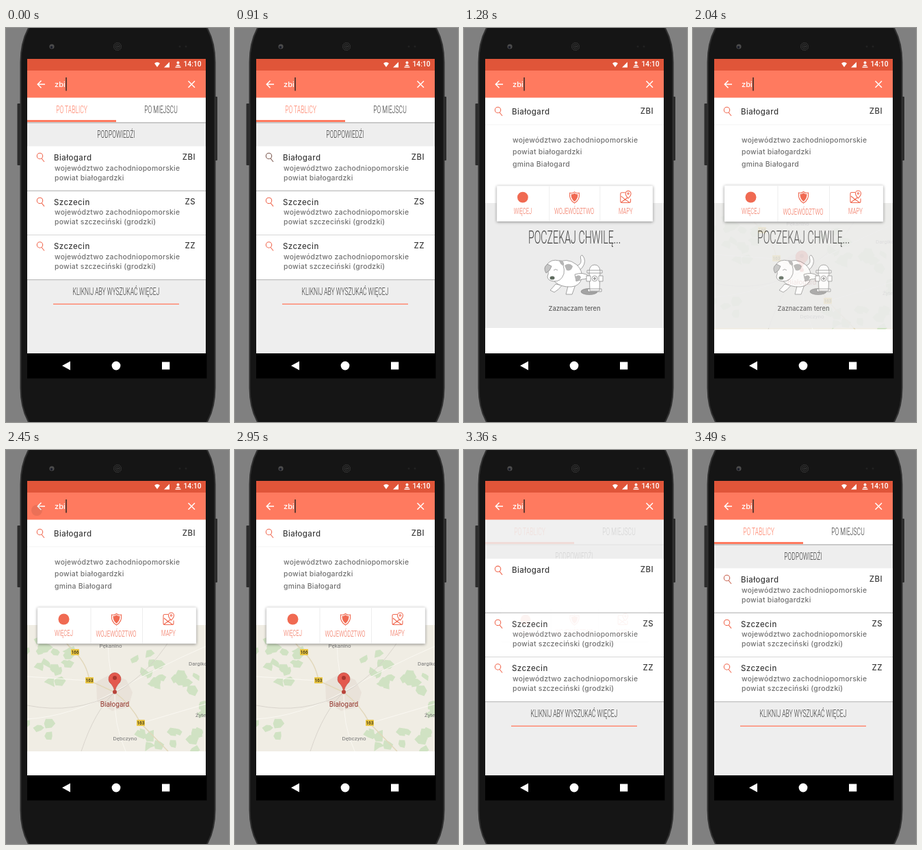
These frames come from a looping animation (326x574 px, 3750 ms). An HTML page:

```html
<!DOCTYPE html>
<html lang="pl">
<head>
<meta charset="utf-8">
<title>Wyszukiwarka tablic</title>
<style>
  html, body { margin: 0; width: 100%; height: 100%; overflow: hidden; background: #808080; }
  svg { display: block; width: 326px; height: 574px; }
  text { font-family: Inter, "Open Sans", sans-serif; }
  .title { font-size: 11.4px; font-weight: 500; letter-spacing: .45px; fill: #3c3c3c; }
  .desc { font-size: 10.4px; font-weight: 500; letter-spacing: .26px; fill: #707070; }
  .thin, .place, .clock { font-family: Roboto, Arial, sans-serif; }
  .thin { font-weight: 300; text-anchor: middle; }
  .place { font-size: 8px; fill: #777; }
  .end { text-anchor: end; }
  .mid { text-anchor: middle; }
  .line { fill: none; stroke: #f06a52; stroke-width: 1.1; }
  .ink { fill: #fff; stroke: #8c8c8c; stroke-width: .8; stroke-linejoin: round; }
</style>
</head>
<body>
<svg id="stage" viewBox="0 0 326 574"></svg>
<script>
const CORAL = '#ff7a5f';
const LOOP = 3750;

const rect = (x, y, w, h, fill, more = '') =>
  `<rect x="${x}" y="${y}" width="${w}" height="${h}" fill="${fill}" ${more}/>`;
const text = (x, y, cls, str) => `<text x="${x}" y="${y}" class="${cls}">${str}</text>`;
// Condensed display face: one squeeze for all headings
const thin = (x, y, size, fill, str) =>
  `<text class="thin" transform="translate(${x} ${y}) scale(.57 1)" font-size="${size}" fill="${fill}">${str}</text>`;
const lens = (y, id = '') =>
  `<g ${id} class="line"><circle cx="49.5" cy="${y - 2}" r="4.2"/><path d="M52 ${y + 1.5}l4 5"/></g>`;
const descLines = (y, gap, lines) => lines.map((s, i) => text(71, y + i * gap, 'desc', s)).join('');

let seed = 7;
const random = () => (seed = seed * 16807 % 2147483647) / 2147483647;

const province = 'województwo zachodniopomorskie';

const row = (y, code) => `
  ${rect(31, y, 261, 64, '#fff')}
  ${rect(31, y + 64, 261, 1.4, '#c4c4c4')}
  ${lens(y + 16)}
  ${text(70, y + 20.4, 'title', 'Szczecin')}
  ${text(277, y + 19.4, 'title end', code)}
  ${descLines(y + 35, 14, [province, 'powiat szczeciński (grodzki)'])}`;

const phone = `
  ${rect(16.5, 110, 6, 90, '#2c2c2c', 'rx="1"')}
  ${rect(303, 100, 6, 93, '#2c2c2c', 'rx="1"')}
  ${rect(21.5, -18, 284, 610, '#151515', 'rx="36" ry="68" stroke="#303030" stroke-width="2"')}
  <circle cx="67" cy="27" r="3.6" fill="#4b4b4b"/><circle cx="66.5" cy="28" r="1.8" fill="#181b28"/>
  <g fill="none" stroke="#555" stroke-dasharray="1.2 .9">
    <circle cx="163" cy="27" r="5.5"/><circle cx="163" cy="27" r="3.4"/><circle cx="163" cy="27" r="1.3"/></g>
  <circle cx="254" cy="27" r="1.5" fill="#222"/><circle cx="263" cy="27" r="1.5" fill="#222"/>`;

const bars = `
  ${rect(31, 45, 261, 17, '#e05539')}
  ${rect(31, 62, 261, 39.5, CORAL)}
  <g fill="#fff">
    <path d="M217 51.5q4-3.6 8 0l-4 5.5z"/>
    <path d="M231 57.5h8v-8z"/>
    <circle cx="251.5" cy="50.5" r="2"/><path d="M248 55.5q3.5-4.5 7 0zM247.5 56.5h8v1.2h-8z"/>
    <text x="259.5" y="56.4" class="clock" font-size="10.3" font-weight="500">14:10</text>
    <text x="71" y="85.5" font-size="11" font-weight="500">zbi</text>
  </g>
  <path d="M57 82H46.5M51.5 76.8L46.3 82l5.2 5.2M266.5 77.2l9.5 9.5m0-9.5l-9.5 9.5" fill="none" stroke="#fff" stroke-width="1.5"/>
  ${rect(87.3, 72, 1.4, 19.5, '#222')}
  ${rect(31, 474, 262.5, 36.5, '#000')}
  <path d="M82 492l12-6.5v13z" fill="#fff"/><circle cx="161" cy="492" r="6.4" fill="#fff"/>
  ${rect(228, 486.5, 11.3, 11, '#fff')}`;

const tabs = `
  ${rect(31, 137, 261, 2, '#c9c9c9')}
  ${rect(31, 101, 261, 36, '#fff')}
  ${rect(31, 134, 130, 3, CORAL)}
  ${thin(96, 123.5, 15, CORAL, 'PO TABLICY')}
  ${thin(226.5, 123.5, 15, '#333', 'PO MIEJSCU')}
  ${thin(161, 160, 15, '#333', 'PODPOWIEDŹI')}`;

// Patches of wood scattered around a few centres: x, y, spread, count
const woods = [
  [44, 285, 15, 7], [76, 300, 18, 8], [60, 325, 22, 6], [205, 296, 28, 5], [212, 332, 14, 7],
  [262, 340, 20, 7], [284, 378, 10, 3], [264, 425, 22, 9], [212, 422, 16, 6], [48, 408, 20, 4]
].map(([x, y, spread, count]) => Array.from({ length: count }, () => {
  const cx = x + (random() * 2 - 1) * spread, cy = y + (random() * 2 - 1) * spread * .7;
  const corners = [0, 1, 2, 3, 4, 5].map(i => {
    const r = 3 + random() * 6;
    return [cx + r * 1.2 * Math.cos(i * 1.05), cy + r * Math.sin(i * 1.05)].map(v => v.toFixed(1));
  });
  return `M${corners.join('L')}z`;
}).join('')).join('');

const roadSign = (x, y, n) => `
  ${rect(x - 6, y - 5, 12, 9, '#e9c543', 'rx="1"')}
  <text x="${x}" y="${y + 2.2}" class="place mid" style="font-size:6.5px;font-weight:700;fill:#554a20">${n}</text>`;

const map = `
  <clipPath id="area">${rect(31, 255, 261, 184, '#fff')}</clipPath>
  <g clip-path="url(#area)">
    ${rect(31, 255, 261, 184, '#f0ede4')}
    <path fill="#d0e2c3" d="${woods}"/>
    <path fill="#e9e2d9" d="M132 338l22-12 22 9 9 18-6 22-24 5-22-14z"/>
    <path fill="none" stroke="#faf8f2" d="M31 392q64-4 128-40t133-66M150 255q-4 50 9 97-2 48 16 87M31 330l88 6M197 398l95-28"/>
    <path fill="none" stroke="#d3cfc7" stroke-width=".8" d="M31 372q70 14 128-18t93-99M110 439q20-60 49-86"/>
    <path fill="none" stroke="#e2d8bb" stroke-width="1.5" d="M70 255q14 24 31 40t21 41q20 9 37 17 24 18 38 45l40 41"/>
    ${roadSign(101, 295, 166)}${roadSign(122, 336, 163)}${roadSign(197, 398, 163)}
    ${text(153, 288, 'place mid', 'Pękanino')}
    ${text(267, 314, 'place', 'Dargikowo')}
    ${text(277, 389, 'place', 'Żytelkowo')}
    ${text(174, 423, 'place mid', 'Dębczyno')}
    <text x="159" y="373.5" class="place mid" style="font-size:10px;fill:#963a32">Białogard</text>
    <circle cx="159" cy="352.5" r="3" fill="#b8443c"/>
    <path d="M159 352q-1.5-7-5-11a9 9 0 1 1 10 0q-3.500 4-5 11z" fill="#e3594e" stroke="#b8443c" stroke-width=".6"/>
    <circle cx="159" cy="332" r="3" fill="#a9362f"/>
  </g>`;

const dog = `
  <ellipse cx="183" cy="384" rx="12" ry="4.5" fill="#a3a3a3" stroke="#858585" stroke-width=".6"/>
  <g class="ink">
    <path d="M163 347q9-2 8-9-2-7 2-7 7 8 0 18-3 4-8 5z"/>
    <path d="M152 376l-3 12h9l5-14zM134 373q-5 6-8 9l6 3q7-4 11-10z"/>
    <path d="M134 343q16-10 31 2 9 9 7 20-3 11-15 12-16 1-25-8z"/>
    <path d="M162 359q12-4 20 2 0 5-9 5l-9 3z"/>
    <path d="M121 345q6-9 18-6 9 6 7 19-4 12-15 11-9-1-9-7 2-4 1-8-4-4-2-9z"/>
    <path d="M122 344q-7 5-2 13 6-3 8-10z" fill="#c4c4c4"/>
    <path d="M131 353q3-3 6 0" fill="none"/>
    <path d="M183 354q1-9 8-9t8 9l-1 29h-14zM180 353h22v4h-22zM181 380h20v4h-20z"/>
    <path d="M179 361h6v8h-6zM197 361h6v8h-6z"/>
    <circle cx="191" cy="365" r="4"/><circle cx="191" cy="365" r="1.5" fill="#aaa"/>
  </g>
  <path d="M147 346q7-5 12 1-2 8-9 6zM163 362q6-4 8 1-2 7-8 5zM139 338q8 0 7 8-6-1-7-8z" fill="#b5b5b5"/>
  <ellipse cx="129" cy="364" rx="3.5" ry="2.600" fill="#5d6a5d"/>`;

const waiting = `
  ${rect(31, 255, 261, 182, '#ececec')}
  ${thin(161.5, 314, 25, '#444', 'POCZEKAJ CHWILĘ...')}
  ${dog}
  <text x="161.5" y="412" class="mid" font-size="9.2" font-weight="500" fill="#606060">Zaznaczam teren</text>`;

const panel = `
  ${rect(46, 229.5, 232, 52.5, '#fff', 'id="shadow" style="filter:drop-shadow(0 1.5px 2px #0007)"')}
  ${rect(46, 229.5, 232, 52.5, '#fff', 'stroke="#eee" stroke-width=".6"')}
  ${rect(123.5, 230, 1, 52, '#eee')}${rect(199, 230, 1, 52, '#eee')}
  <circle cx="84.5" cy="246.5" r="8" fill="#f06a52"/>
  <g class="line">
    <path d="M154.5 240q4 1 7-1.5 3 2.5 7 1.5 1.5 10-7 15-8.5-5-7-15z"/>
    <path d="M157 242.5q3 0 4.5-1.500 1.5 1.5 4.5 1.5 0 6-4.5 9.5-4.5-3.5-4.5-9.5z" fill="#f06a52"/>
    <path d="M237 239.5h-5q-2 0-2 2v11q0 2 2 2h11q2 0 2-2v-4M231 254l12-9M231 245l5 4 7 5"/>
    <path d="M241.5 248q-4-4-4-7a4 4 0 0 1 8 0q0 3-4 7z" fill="#fff"/><circle cx="241.5" cy="241" r="1.2"/>
  </g>
  ${thin(84.5, 271, 13.5, '#f06a52', 'WIĘCEJ')}
  ${thin(161, 271.5, 13.5, '#f06a52', 'WOJEWÓDZTWO')}
  ${thin(237.5, 271, 13.5, '#f06a52', 'MAPY')}`;

document.getElementById('stage').innerHTML = `
  <clipPath id="body">${rect(31, 101, 261, 373, '#fff')}</clipPath>
  ${rect(0, 0, 326, 574, '#808080')}
  ${phone}
  <g clip-path="url(#body)">
    ${rect(31, 101, 261, 374, '#eee')}
    <g id="tabs">${tabs}</g>
    ${row(237.4, 'ZS')}${row(302, 'ZZ')}
    ${thin(161, 389, 15, '#333', 'KLIKNIJ ABY WYSZUKAĆ WIĘCEJ')}
    ${rect(69, 401.5, 184, 1.5, '#ff8a72')}
    <rect id="edge" x="31" width="261" height="1.4" fill="#bbb"/>
    <rect id="card" x="31" width="261" fill="#fff"/>
    <g id="head">
      ${lens(188.5, 'id="lens"')}
      ${text(70, 192.6, 'title', 'Białogard')}${text(277, 191.6, 'title end', 'ZBI')}
    </g>
    <g id="brief">${descLines(207.5, 14, [province, 'powiat białogardzki'])}</g>
    <g id="details">
      ${rect(31, 140.5, 261, .8, '#f1f1f1')}
      ${descLines(167, 17.3, [province, 'powiat białogardzki', 'gmina Białogard'])}
    </g>
    <g id="map">${map}</g>
    <g id="waiting">${waiting}</g>
    <g id="panel">${panel}</g>
  </g>
  ${bars}
  <circle id="tap" r="8" fill="#000"/>`;

const el = {};
document.querySelectorAll('[id]').forEach(node => el[node.id] = node);
const set = (id, attrs) => {
  for (const key in attrs) el[id].setAttribute(key, attrs[key]);
};

const seg = (t, a, b) => Math.min(1, Math.max(0, (t - a) / (b - a)));
const ease = k => k < .5 ? 2 * k * k : 1 - 2 * (1 - k) ** 2;
const easeOut = k => 1 - (1 - k) ** 3;
// Rises over a..b and falls over c..d
const hump = (t, a, b, c, d) => ease(seg(t, a, b)) * (1 - ease(seg(t, c, d)));

function draw(t) {
  const open = hump(t, 930, 1200, 3100, 3480);
  const top = 172.3 - 71 * open;
  const bottom = 236.4 + 240 * hump(t, 990, 1220, 3060, 3220);
  set('card', { y: top, height: bottom - top });
  set('edge', { y: bottom });
  set('head', { transform: `translate(0 ${-67 * open})` });
  set('brief', { transform: `translate(0 ${-67 * open})`, opacity: 1 - hump(t, 905, 1010, 3370, 3480) });
  set('tabs', { opacity: 1 - hump(t, 910, 1030, 3320, 3470) });
  set('details', { opacity: hump(t, 1110, 1260, 3050, 3200) });

  set('waiting', { opacity: seg(t, 1160, 1270) * (1 - seg(t, 2010, 2250)) });
  set('map', { opacity: t < 1900 ? 0 : 1 - seg(t, 3050, 3170) });

  const scale = .93 + .07 * easeOut(seg(t, 1130, 1540)) - .08 * seg(t, 3050, 3400);
  set('panel', {
    transform: `translate(162 256) scale(${scale}) translate(-162 -256)`,
    opacity: hump(t, 1130, 1260, 3230, 3390)
  });
  set('shadow', { opacity: hump(t, 1130, 1270, 3050, 3250) });

  const dark = t >= 910 && t < 1280 ? 1 - seg(t, 950, 1150) : .35 * seg(t, 3440, 3490);
  el.lens.style.stroke = `rgb(${240 - 115 * dark},${106 - 16 * dark},${82 - 2 * dark})`;

  const back = t > 2000;
  set('tap', {
    cx: back ? 45 : 206.5,
    cy: back ? 88 : 221,
    opacity: back ? .08 * (t >= 2450) * (1 - seg(t, 2700, 2950)) : .08 * (t >= 500) * (1 - seg(t, 640, 760))
  });
}

const start = performance.now();
function tick() {
  draw((performance.now() - start) % LOOP);
  requestAnimationFrame(tick);
}
tick();
</script>
</body>
</html>
```
